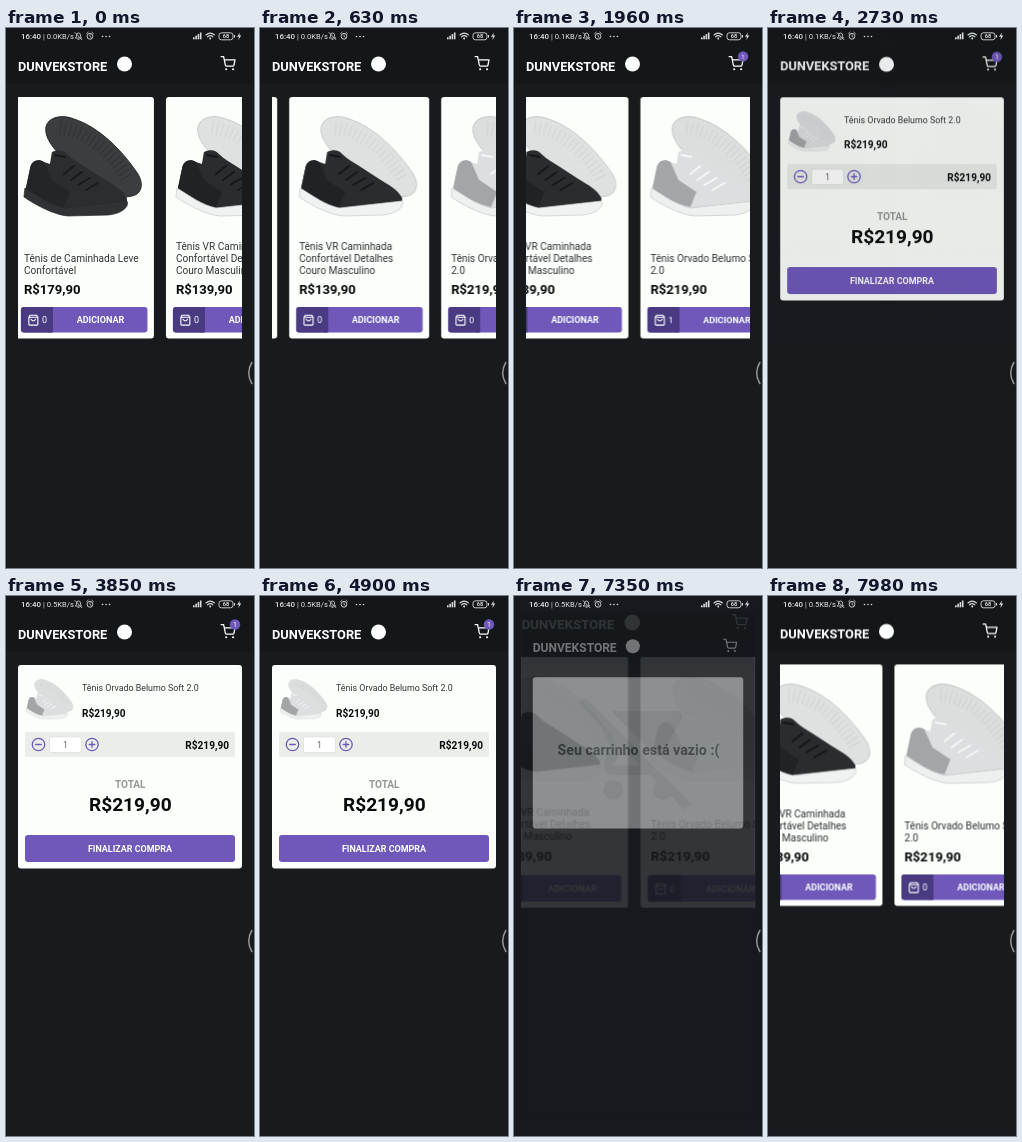
An HTML page that plays this animation: 248 by 540 pixels, repeating every 8 s.

```html
<!DOCTYPE html>
<html lang="pt-BR">
<head>
<meta charset="utf-8">
<title>Loja de tênis</title>
<style>
html, body { margin: 0; width: 100%; height: 100%; overflow: hidden; background: #171b1e; }
svg { display: block; width: 100vw; height: 100vh; font-family: Roboto, Arial, sans-serif; }
.b { font-weight: 700; }
.m { text-anchor: middle; }
.line { fill: none; stroke-linecap: round; stroke-linejoin: round; }
.screen { transform-origin: 124px 270px; }
#swipe { transform-origin: 248px 297px; }
</style>
</head>
<body>
<svg id="stage" viewBox="0 0 248 540" preserveAspectRatio="none"></svg>
<script>
const LOOP = 8000;
const PURPLE = '#6f58ba', PAPER = '#fcfefb', INK = '#090a0b';
const stage = document.getElementById('stage');

const text = (x, y, size, fill, value, cls = '', extra = '') =>
  `<text x="${x}" y="${y}" font-size="${size}" fill="${fill}" class="${cls}" ${extra}>${value}</text>`;
const rect = (x, y, w, h, fill, r = 0, extra = '') =>
  `<rect x="${x}" y="${y}" width="${w}" height="${h}" rx="${r}" fill="${fill}" ${extra}/>`;
const line = (d, stroke, width, extra = '') =>
  `<path class="line" d="${d}" stroke="${stroke}" stroke-width="${width}" ${extra}/>`;
const circle = (x, y, r, fill, extra = '') => `<circle cx="${x}" cy="${y}" r="${r}" fill="${fill}" ${extra}/>`;

const BACK = 'M32 99C34 89 48 86 60 91C85 99 108 122 124 146C130 156 128 166 118 168C104 172 80 160 60 140C44 126 30 112 32 99Z';
const UPPER = 'M16 141C17 133 24 130 30 134L36 136L38 124C44 121 50 122 53 126C58 131 64 134 70 138L90 151C100 157 109 162 113 170C114 178 106 182 92 182L46 181C30 176 12 168 12 160Z';
const SOLE = 'M11 160C24 168 36 177 50 180L113 173C116 179 107 186 94 187L54 188C40 187 20 176 10 169Z';
const HEEL = 'M16 141C17 133 24 130 30 134L38 152L56 164L50 179C36 176 20 168 12 160Z';

const shoe = c => `
  <path d="${BACK}" fill="${c.back}" stroke="${c.edge}" stroke-width="1"/>
  ${line('M46 100C74 102 100 126 114 152', c.edge, 13, 'stroke-dasharray="1 4" style="stroke-linecap:butt" opacity=".55"')}
  <path d="${UPPER}" fill="${c.upper}"/>
  <path d="${HEEL}" fill="${c.heel}"/>
  <path d="${SOLE}" fill="${c.sole}" stroke="${c.edge}" stroke-width=".7"/>
  ${line('M41 127L51 129M50 146L60 138M57 152L68 144M64 157L76 150M72 162L84 155', c.lace, 2)}`;

const black = { back: '#3b3d3f', edge: '#27292b', upper: '#2b2d2f', heel: '#232527', sole: '#303234', lace: '#17191a' };
const mixed = { back: '#dfe1e1', edge: '#c8cbcb', upper: '#2a2c2e', heel: '#202224', sole: '#f0f2f1', lace: '#151718' };
const white = { back: '#dcdede', edge: '#c5c8c8', upper: '#dcdfdf', heel: '#a3a5a6', sole: '#eef0ef', lace: '#f6f8f7' };

const bag = line('M15.5 218.5l1.4-1.8h6.2l1.4 1.8v7.2q0 .9-.9.9h-7.2q-.9 0-.9-.9zM15.5 218.8h9M17.7 220.8q2.3 3.4 4.6 0', '#fff', 1.1, 'transform="translate(-.6 70.5)"');

function card(index, colors, rows, price) {
  const first = 245.5 - 12 * (rows.length - 1);
  const count = (id, n) => text(30.5, 295.3, 9, '#fff', n, 'm', `id="${id}${index}"`);
  return `<g transform="translate(${index * 152} 0)">
    ${rect(0, 69, 140, 241.5, PAPER, 3)}${shoe(colors)}
    ${rows.map((row, i) => text(10, first + 12 * i, 10.1, '#303335', row)).join('')}
    ${text(10, 265.7, 13.1, INK, price, 'b')}
    ${rect(7, 279, 126.5, 25.5, PURPLE, 3)}${rect(7, 279, 32, 25.5, '#4a3a82', 3)}${rect(35, 279, 4, 25.5, '#4a3a82')}
    ${bag}${count('zero', 0)}${index === 2 ? count('one', 1) : ''}
    ${text(86.5, 295.2, 9, '#fff', 'ADICIONAR', 'b m')}
  </g>`;
}

const badge = id => `<g id="${id}">${circle(229, 28.5, 5.2, PURPLE)}${text(229, 31, 7, '#fff', '1', 'm')}</g>`;
const header = `
  ${rect(0, 0, 248, 56, '#14171a')}
  ${text(12, 42.5, 12.8, '#fff', 'DUNVEKSTORE', 'b')}
  ${circle(118.5, 36, 7.5, '#fff')}
  <g transform="translate(214.5 28) scale(.63)">
    ${line('M1 1h4l2.7 13.4a2 2 0 0 0 2 1.6h9.7a2 2 0 0 0 2-1.6L23 6H6', '#fff', 2)}
    ${circle(9, 21, 1.7, '#fff')}${circle(20, 21, 1.7, '#fff')}
  </g>`;
const screen = (id, body) =>
  `<g id="${id}" class="screen">${rect(0, 0, 248, 540, '#171b1e')}${header}${body}</g>`;

const home = screen('home', `${badge('badge')}<g clip-path="url(#list)"><g id="scroll">
  ${card(0, black, ['Tênis de Caminhada Leve', 'Confortável'], 'R$179,90')}
  ${card(1, mixed, ['Tênis VR Caminhada', 'Confortável Detalhes', 'Couro Masculino'], 'R$139,90')}
  ${card(2, white, ['Tênis Orvado Belumo Soft', '2.0'], 'R$219,90')}
</g></g>`);

const ring = x => circle(x, 148.5, 6.2, 'none', `stroke="${PURPLE}" stroke-width="1.3"`);
const cart = screen('cart', `${badge('cartBadge')}
  ${rect(12, 69, 224, 203.5, PAPER, 3)}
  <g transform="translate(16 48) scale(.4)">${shoe(white)}</g>
  ${text(76, 95, 8.85, '#303335', 'Tênis Orvado Belumo Soft 2.0')}
  ${text(76, 120.5, 10.1, INK, 'R$219,90', 'b')}
  ${rect(19, 136, 210, 25, '#eaeee9', 2)}
  ${ring(32.5)}${ring(86)}${line('M29.7 148.5h5.6M83.2 148.5h5.6M86 145.7v5.6', PURPLE, 1.3)}
  ${rect(43.5, 141, 32, 15.5, '#fff', 2, 'stroke="#d8dbd8" stroke-width=".7"')}
  ${text(59.5, 152, 8.8, '#666', '1', 'm')}
  ${text(223, 152.6, 10.1, INK, 'R$219,90', 'b', 'text-anchor="end"')}
  ${text(124.3, 191.6, 10.1, '#949896', 'TOTAL', 'b m')}
  ${text(124.3, 214.6, 19.1, INK, 'R$219,90', 'b m')}
  ${rect(19, 239, 210, 27, PURPLE, 3)}
  ${text(124, 256, 8.95, '#fff', 'FINALIZAR COMPRA', 'b m')}`);

const cartOff = 'M22.73 22.73L1.27 1.27 0 2.54l4.39 4.39 2.21 4.66-1.35 2.45c-.16.28-.25.61-.25.96 0 1.1.9 2 2 2h7.46l1.38 1.38c-.5.36-.83.95-.83 1.62 0 1.1.89 2 1.99 2 .67 0 1.26-.33 1.62-.84L21.46 24zM7.42 15c-.14 0-.25-.11-.25-.25l.03-.12.9-1.63h2.36l2 2zM15.55 13c.75 0 1.41-.41 1.75-1.03l3.58-6.49c.08-.14.12-.31.12-.48 0-.55-.45-1-1-1H6.54zM7 18a2 2 0 1 0 0 4 2 2 0 0 0 0-4z';
const empty = screen('empty', `
  ${rect(12, 69, 224, 161, PAPER, 3)}
  <path d="${cartOff}" fill="#e9ede9" transform="translate(61 84) scale(5.25)"/>
  ${text(124.5, 152.3, 15.15, '#626865', 'Seu carrinho está vazio :(', 'b m')}`);

const ICON = '#d9dcdc';
const speed = (id, value) => text(37, 11, 7.6, '#e4e6e6', `| ${value}KB/s`, '', `id="${id}"`);
const status = `
  ${text(15, 11, 7.9, '#e4e6e6', '16:40', '', 'font-weight="500"')}
  ${speed('slow', '0.0')}${speed('mid', '0.1')}${speed('fast', '0.5')}
  ${line('M69.5 10h6l-1-1.6V7a2 2 0 0 0-4 0v1.4zM72 11.4h1M69 4.6l7 7.2', ICON, .8)}
  ${circle(84, 8.3, 2.9, 'none', `stroke="${ICON}" stroke-width=".9"`)}
  ${line('M84 6.8v1.7l1.1.7M80.6 5.6l1.6-1.4M87.4 5.6l-1.6-1.4', ICON, .8)}
  ${[96.5, 100, 103.5].map(x => circle(x, 8.5, .8, ICON)).join('')}
  ${[0, 1, 2, 3].map(i => rect(187 + 2.3 * i, 9.3 - 1.6 * i, 1.6, 2 + 1.6 * i, ICON)).join('')}
  ${line('M200 7q4.2-3.8 8.4 0M201.5 8.8q2.7-2.3 5.4 0', ICON, 1.1)}${circle(204.2, 10.6, 1, ICON)}
  ${rect(213, 4.8, 14, 7, 'none', 2.4, `stroke="${ICON}" stroke-width=".9"`)}${rect(228, 7, 1, 2.6, ICON)}
  ${text(220, 10.4, 5.6, ICON, '68', 'm b')}
  <path d="M234 4.5l-3 4.3h2l-.7 3.2 3-4.4h-2z" fill="${ICON}"/>`;

stage.innerHTML = `
  <defs><clipPath id="list">${rect(12, 60, 224, 260, '#000')}</clipPath></defs>
  ${rect(0, 0, 248, 540, '#171b1e')}
  ${home}${cart}${empty}${status}
  <path id="swipe" d="M248 235C248 270 238 275 238 297C238 320 248 325 248 359Z" fill="#050607"/>
  ${line('M245.8 334.5Q239.6 345 245.8 355.5', '#8d9092', 1.6)}`;

// Each step is [time in ms, styles, easing towards the next step]; the first and last poses are held.
function play(id, steps) {
  const all = [[0, steps[0][1]], ...steps, [LOOP, steps.at(-1)[1]]];
  const frames = all.map(([ms, styles, easing = 'linear']) => ({ offset: ms / LOOP, easing, ...styles }));
  document.getElementById(id).animate(frames, { duration: LOOP, iterations: Infinity });
}

const fade = opacity => ({ opacity });
const zoom = (scale, y = 0) => ({ transform: `translateY(${y}px) scale(${scale})` });
const move = x => ({ transform: `translateX(${x}px)` });
const wide = s => ({ transform: `scaleX(${s})` });

// Hard switches: pairs of [time in ms, opacity].
const flip = (id, ...pairs) => play(id, pairs.map(([ms, o]) => [ms, fade(o), 'step-end']));

const ADD = 1450, OPEN = 2430, REMOVE = 5550, CLOSE = 7280, TURN = 400;
const SETTLE = 'cubic-bezier(.208,.82,.25,1)';

play('scroll', [[0, move(8), 'cubic-bezier(.25,.1,.5,1)'], [1200, move(-177.6)]]);

// The outgoing screen drops quickly, the incoming one comes up in two stages.
const leave = (start, rest) => [[start, fade(1)], [start + 20, fade(rest), 'ease-out'], [start + TURN, fade(0)]];
const enter = (start, part) => [[start, fade(0)], [start + 115, fade(part), 'ease-out'], [start + TURN, fade(1)]];

play('home', [...leave(OPEN, .33), ...enter(CLOSE, .33)]);
play('home', [
  [OPEN, zoom(1), SETTLE], [OPEN + TURN, zoom(1.1)],
  [CLOSE, zoom(1.1), SETTLE], [CLOSE + TURN, zoom(1, -.6)]
]);
play('cart', [...enter(OPEN, .5), [REMOVE, fade(1), 'step-end'], [REMOVE + 1, fade(0)]]);
play('cart', [[OPEN, zoom(.85), SETTLE], [OPEN + TURN, zoom(1)]]);
play('empty', [[0, fade(0), 'step-end'], [REMOVE, fade(1)], ...leave(CLOSE, .5)]);
play('empty', [[CLOSE, zoom(1), SETTLE], [CLOSE + TURN, zoom(.9)]]);

play('swipe', [
  [6020, wide(0)], [6160, wide(1), 'ease-out'], [6400, wide(1.8)],
  [7050, wide(1.8), 'ease-in'], [7200, wide(0)]
]);

flip('badge', [0, 0], [ADD, 1], [REMOVE, 0]);
flip('one2', [0, 0], [ADD, 1], [REMOVE, 0]);
flip('zero2', [0, 1], [ADD, 0], [REMOVE, 1]);
flip('slow', [0, 1], [1200, 0]);
flip('mid', [0, 0], [1200, 1], [3500, 0]);
flip('fast', [0, 0], [3500, 1]);
</script>
</body>
</html>
```
